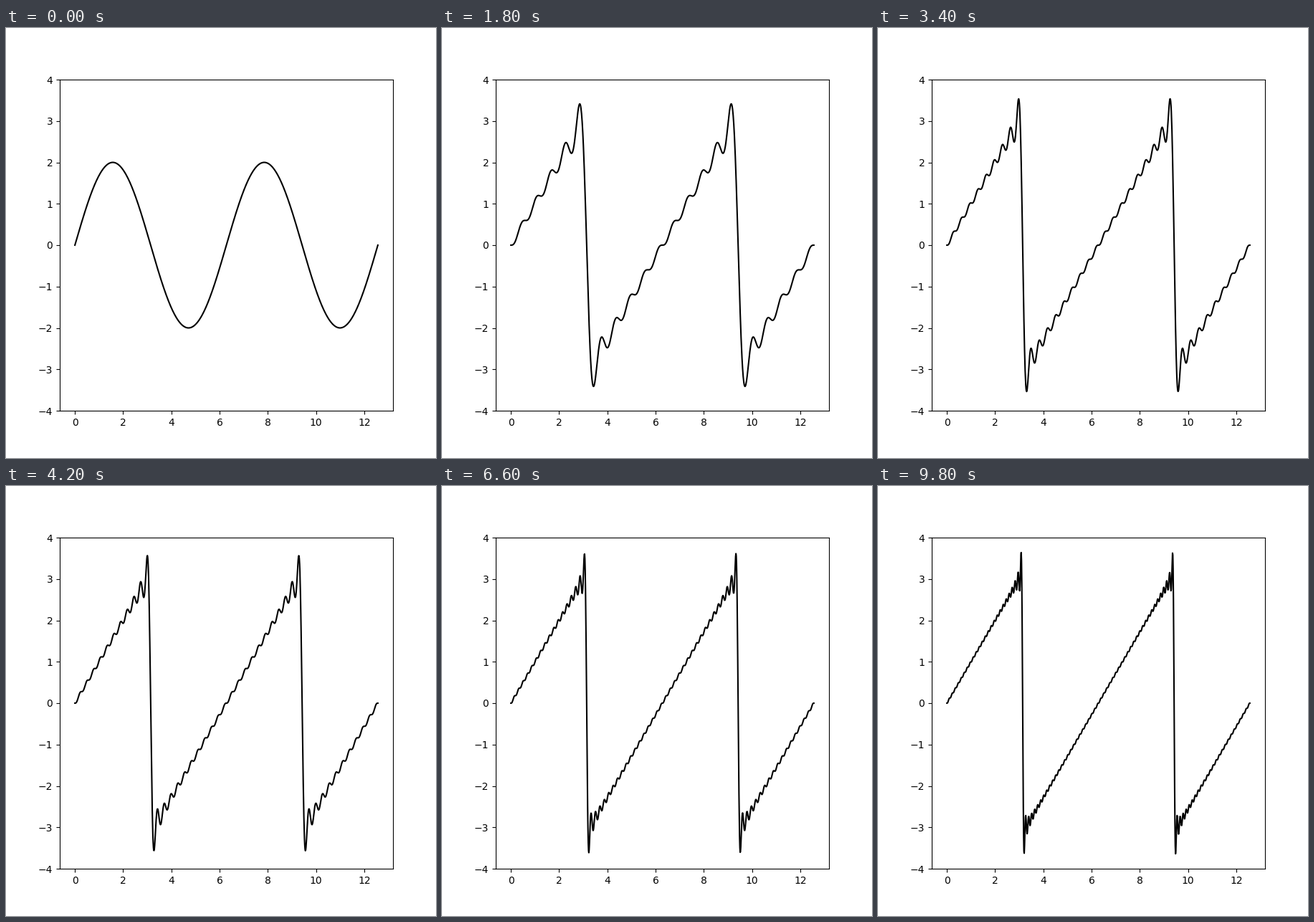
A matplotlib script for the animation above (10000 ms loop, 600x600 px).

```python
import numpy as np
import matplotlib.pyplot as plt
from matplotlib.animation import FuncAnimation

FRAMES = 50
INTERVAL = 200  # ms

x = np.linspace(0, 4 * np.pi, 1000)


def sawtooth(terms):
    """Partial Fourier sum of a sawtooth wave."""
    n = np.arange(1, terms + 1)[:, None]
    return np.sum(2 * (-1.0) ** (n + 1) / n * np.sin(n * x), axis=0)


fig, ax = plt.subplots(figsize=(6, 6), dpi=100)
line, = ax.plot(x, sawtooth(1), color="black", lw=1.5)
ax.set_ylim(-4, 4)


def update(i):
    line.set_ydata(sawtooth(i + 1))
    return line,


anim = FuncAnimation(fig, update, frames=FRAMES, interval=INTERVAL,
                     repeat=True, repeat_delay=0)
plt.show()
```
